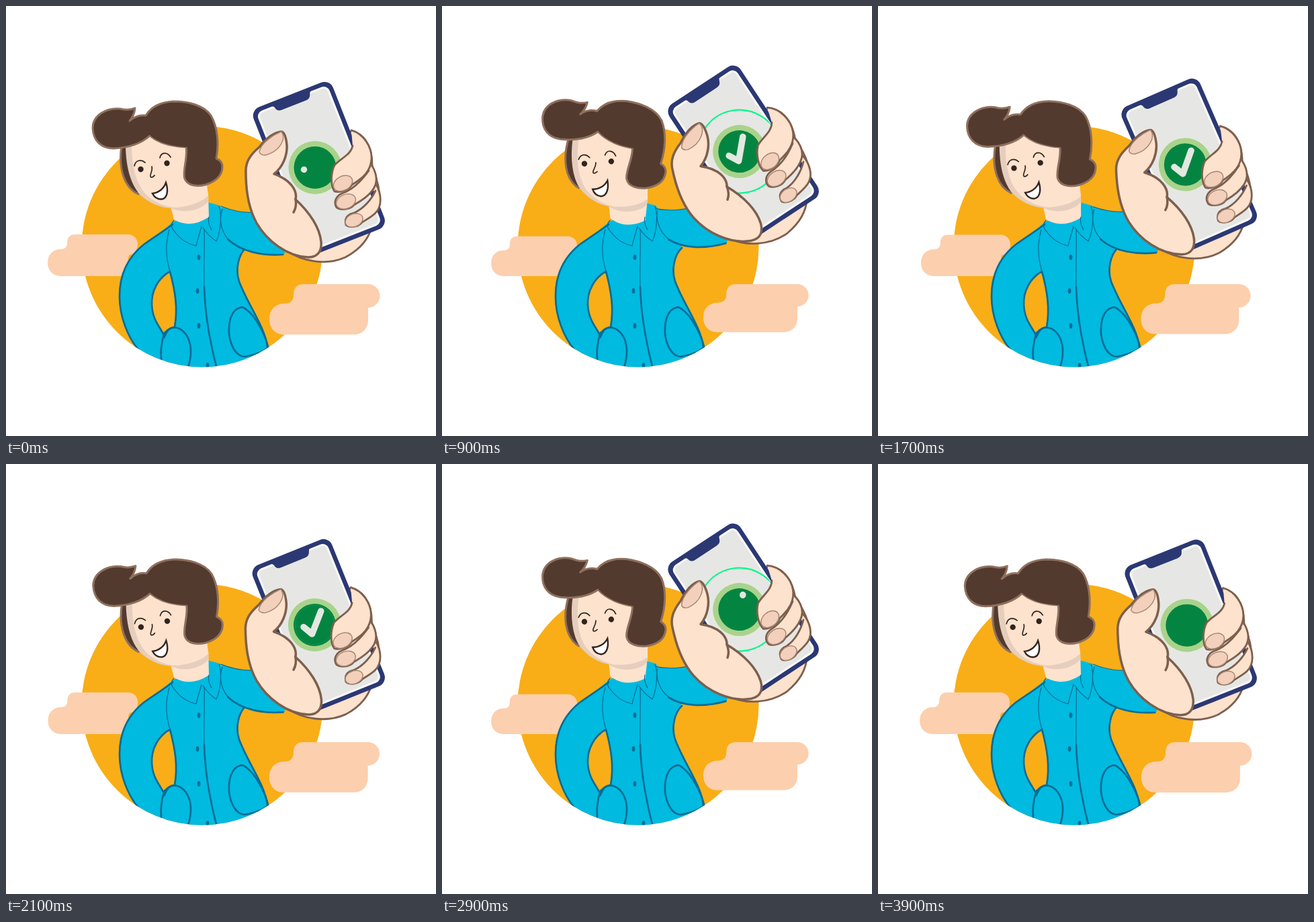
Animation, 640 px wide and 640 px high, one loop 4000 ms. Source, as an HTML page:

```html
<!DOCTYPE html>
<html lang="en">
<head>
<meta charset="utf-8">
<title>Payment confirmed</title>
<style>
  html, body { margin: 0; height: 100%; overflow: hidden; background: #fff; }
  svg { display: block; width: 100vw; height: 100vh; }
  .cloud { fill: #fccfae; }
  .blue { fill: #00bae0; }
  .seam { fill: none; stroke: #086c95; stroke-width: 2.7; stroke-linecap: round; }
  .thin { stroke-width: 1.2; }
  .skin { fill: #fde2cd; }
  .hand { fill: #fde2cd; stroke: #7d5f4e; stroke-width: 2.8; stroke-linejoin: round; stroke-linecap: round; }
  .bold { stroke-width: 3.5; }
  .nail { fill: #f2d0bb; stroke: #a58470; stroke-width: 1.4; }
  .shade { fill: #e5cebd; }
  .hair { fill: #533a2e; stroke: #8f705e; stroke-width: 3; stroke-linejoin: round; }
  .ink { fill: none; stroke: #30241f; stroke-width: 1.7; stroke-linecap: round; }
  .navy { fill: #2b3873; }
</style>
</head>
<body>
<svg viewBox="0 0 640 640">
  <defs>
    <clipPath id="disc"><circle cx="292" cy="358" r="179.500"/></clipPath>
    <clipPath id="glass"><rect x="-56" y="-109" width="112" height="219" rx="8" transform="translate(465.5 240.5) rotate(-21.5)"/></clipPath>
  </defs>

  <circle cx="292" cy="358" r="179.500" fill="#f9ae17"/>

  <path id="cloudLeft" class="cloud" d="M103 340H181C191 340 196 347 196 355C196 364 191 370 185 370Q182 371 182 376V402H82C69 402 62 393 62 382C62 370 70 362 81 362Q91 362 91 353Q91 340 103 340Z"/>
  <path id="cloudRight" class="cloud" d="M443 414H539A17.5 17.5 0 0 1 539 449Q539 449 539 455V467C539 481 530 489 517 489H414C400 489 392 479 392 466C392 451 402 443 414 443Q428 443 428 430Q428 414 443 414Z"/>

  <g clip-path="url(#disc)">
    <path class="blue" d="M248 322C235 333 220 344 205 355C180 375 168 400 168 432C168 460 180 495 203 518L210 560H390V508C386 480 360 445 347 410C341 392 346 370 357 360L345 330L318 297L300 292Z"/>
    <path class="seam" d="M248 325C235 335 220 344 205 355C180 375 169 400 169 432C169 460 180 495 203 518M357 360C346 370 341 392 347 410C360 445 386 478 389 508"/>
    <path class="seam" style="fill:#f9ae17" d="M244 395C226 405 216 425 217 445C218 468 230 478 236 492C240 482 246 478 251 478C256 450 252 425 244 395Z"/>
    <path class="seam thin" d="M243 333C238 350 237 372 244 395M295 332C296 360 294 390 295 420"/>
    <path class="seam" d="M295 418C296 455 302 495 314 540M236 486C231 500 229 520 233 540M236 487C245 475 258 476 268 489C277 502 277 522 270 540"/>
    <path class="seam" d="M348 449C335 453 331 470 332 488C334 505 342 521 355 522C370 520 388 512 390 507C386 490 372 462 358 452C354 448 350 448 348 449Z"/>
    <g fill="#086c95">
      <ellipse cx="287" cy="374" rx="2.4" ry="4"/><ellipse cx="285" cy="424" rx="2.4" ry="4"/>
      <ellipse cx="287" cy="476" rx="2.4" ry="4"/><ellipse cx="300" cy="535" rx="2.4" ry="4"/>
    </g>
  </g>

  <g id="head">
    <path class="hair" d="M172 208C167 240 175 270 197 280L201 260L185 205Z"/>
    <path class="skin" d="M243 290L250 318Q275 332 302 314L301 280Z"/>
    <path class="shade" d="M240 298C262 312 290 304 301 291V280L245 288Z"/>
    <path class="shade" d="M178 206C178 235 184 262 197 278C212 295 235 302 252 301C275 299 291 293 301 282L298 260L270 190H215Z"/>
    <path class="skin" d="M187 206C187 235 192 262 207 279C220 293 240 300 255 300C278 297 292 291 301 282L298 260L270 190H215Z"/>
    <path class="hair" d="M268 210C271 225 262 247 266 257C270 268 285 269 297 266C313 261 322 252 322 239C322 232 318 229 313 227C317 205 315 180 305 163C294 147 270 142 249 142C229 143 216 150 208 163Q195 161 184 171Q191 163 192 152C183 155 178 155 170 153C149 151 129 163 129 182C130 201 142 212 160 212C182 211 200 206 214 193C225 202 240 209 268 210Z"/>
    <path fill="#533a2e" d="M214 192C225 202 242 209 270 210L275 180L205 175Z"/>
    <g fill="#30241f"><circle cx="200.500" cy="243" r="4.200"/><circle cx="239.500" cy="234" r="4.200"/></g>
    <path class="ink" d="M191 238C193 229 201 228 207 233M229 226C231 217 240 217 245 225M217 239C219 246 212 253 216 255Q219 255 221 252"/>
    <path class="ink" style="fill:#fff;stroke-width:2.400" d="M218 279C227 278 235 272 238 263C242 275 240 286 232 287.500C225 288 221 285 218 279Z"/>
  </g>

  <path class="seam thin" d="M250 319C244 325 246 331 252 337C262 351 274 355 283 357C285 348 288 339 291 328M293 330Q302 343 313 350C319 338 322 312 317 298M302 314C300 322 303 328 306 333"/>

  <g id="arm">
    <path class="hand" d="M420 365C440 380 476 387 505 374C526 363 539 348 544 330L470 335Z"/>
    <path class="blue" d="M319 298C335 304 352 309 372 307L420 345L414 370C385 372 355 368 335 352C320 340 316 318 322 300Z"/>
    <path class="seam thin" d="M320 298C335 304 352 309 374 307M322 302C316 320 321 340 335 351"/>
    <path class="seam" d="M330 347C350 366 382 372 412 370"/>

    <path class="hand" d="M505 187C532 184 546 208 545 240C556 265 562 298 548 312L510 300Z"/>
    <g transform="translate(465.5 240.5) rotate(-21.5)">
      <rect class="navy" x="-63.5" y="-116.5" width="127" height="235" rx="14"/>
      <rect x="-55.500" y="-108.500" width="111" height="219" rx="8" fill="#e6e7e4" stroke="#fafafa" stroke-width="3"/>
      <path class="navy" d="M-33 -111H32Q29 -110 28 -107Q26 -100 19 -100H-20Q-27 -100 -28 -107Q-29 -110 -33 -111Z"/>
    </g>
    <g clip-path="url(#glass)">
      <circle id="halo" cx="460" cy="240.500" r="39.500"/>
      <circle cx="460" cy="240.500" r="31.500" fill="#038541"/>
      <circle id="ripple" cx="460" cy="240.500" fill="none" stroke="#08f78d"/>
      <path id="check" d="M443.500 243.500L456 254L469.500 220" pathLength="1" fill="none" stroke="#e3e8e1" stroke-width="9.500" stroke-linecap="round" stroke-linejoin="round"/>
    </g>

    <path class="hand bold" d="M410 187C396 188 385 200 377 210C364 221 356 232 357 248C357 275 362 303 373 323C388 349 418 373 450 374C465 374 470 364 469 351C467 331 453 308 431 288C434 275 424 259 399 250C412 240 419 222 418 207C417 196 415 188 410 187Z"/>
    <path class="nail" d="M377 217C380 203 398 192 410 187C418 198 407 217 386 222Q378 222 377 217Z"/>
    <path class="hand bold" style="fill:none" d="M431 287Q433 299 428 307"/>

    <path class="hand" d="M551 266C559 280 560 298 550 308C544 314 536 318 530 322C524 330 510 330 506 326C503 316 508 310 518 308C532 302 544 288 550 275"/>
    <ellipse class="nail" cx="518" cy="319" rx="13.500" ry="9.500" transform="rotate(-22 518 319)"/>
    <path class="hand" d="M545 238C553 252 553 265 545 275C537 286 525 292 518 296C512 304 497 304 492 300C487 292 491 283 500 279C515 274 528 262 540 245"/>
    <ellipse class="nail" cx="506" cy="291" rx="15" ry="10.500" transform="rotate(-22 506 291)"/>
    <path class="hand" d="M514 185C532 190 545 210 544 228C543 245 532 256 515 266C510 275 495 278 489 276C483 268 483 250 489 237C499 226 513 222 516 208"/>
    <ellipse class="nail" cx="501.500" cy="264" rx="15" ry="10.500" transform="rotate(-28 501.5 264)"/>
  </g>
</svg>
<script>
const LOOP = 4000, SWING = 2000;
const el = id => document.getElementById(id);
const set = (id, attrs) => {
  for (const name in attrs) el(id).setAttribute(name, attrs[name]);
};
const clamp = x => Math.min(1, Math.max(0, x));
const ease = x => (1 - Math.cos(Math.PI * x)) / 2;
const spin = (id, angle, x, y) => set(id, { transform: `rotate(${angle} ${x} ${y})` });
const zoom = (id, k, x, y) =>
  set(id, { transform: `translate(${x} ${y}) scale(${k}) translate(${-x} ${-y})` });

function draw(t) {
  const lift = ease((t + 25) / 1000);
  spin('arm', -12 * lift, 336, 312);
  spin('head', 8.2 * lift, 265, 320);
  zoom('cloudLeft', 1 - 0.046 * lift, 308, 402);
  zoom('cloudRight', 1 - 0.048 * lift, 327, 414);

  // The tick draws itself, then is wiped away from its start.
  const tail = ease(clamp((t - 2500) / 430));
  const tip = ease(clamp(t / 430));
  set('check', {
    'stroke-dasharray': `${tip - tail} 3`,
    'stroke-dashoffset': -tail,
    visibility: t < 2950 ? 'visible' : 'hidden'
  });

  const beat = t % SWING;
  const wave = clamp((beat - 50) / 1050);
  set('ripple', {
    r: 27 + 43 * wave,
    'stroke-width': 7 * Math.sin(Math.PI * wave) ** 2,
    visibility: wave > 0 && wave < 1 ? 'visible' : 'hidden'
  });
  const glow = clamp(1 - Math.abs(beat - 500) / 250);
  set('halo', { fill: `rgb(${169 + 13 * glow},${211 - 25 * glow},${139 - 8 * glow})` });
}

function tick() {
  draw(performance.now() % LOOP);
  requestAnimationFrame(tick);
}
tick();
</script>
</body>
</html>
```
